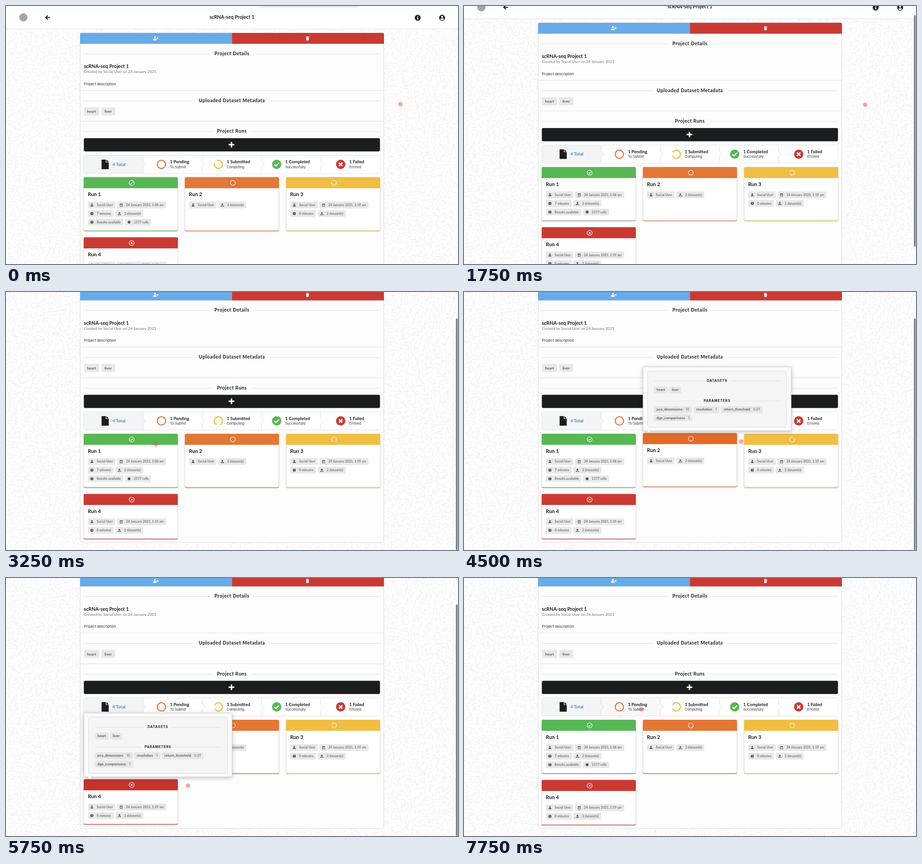
An HTML page with a canvas that plays this animation: 989x566 px, repeating every 8 s.

```html
<!DOCTYPE html>
<html lang="en">
<head>
<meta charset="utf-8">
<title>Project runs</title>
<style>
html, body { margin: 0; width: 100%; height: 100%; overflow: hidden; background: #fff; }
canvas { display: block; }
</style>
</head>
<body>
<canvas id="stage" width="989" height="566"></canvas>
<script>
const W = 989, H = 566, LOOP = 8000, STEP = 250, PAGE_H = 630.6;
const ctx = document.getElementById('stage').getContext('2d');
const USER = 'Social User';
const GREEN = '#57b753', ORANGE = '#e37735', YELLOW = '#f1be43', RED = '#ca3a33';
const DARK = '#1b1c1d', LINE = '#dedede', GREY = '#595959';

const disc = r => `M${-r} 0a${r} ${r} 0 1 0 ${2 * r} 0a${r} ${r} 0 1 0 ${-2 * r} 0z`;
const PERSON = 'M0-4a2 2 0 0 1 0 4a2 2 0 0 1 0-4zM-3.5 3.6v-1q0-2 2-2h3q2 0 2 2v1z';
const ICONS = {
  user: PERSON,
  calendar: 'M-3-3h1v-1h1v1h2v-1h1v1h1q.5 0 .5.5v6q0 .5-.5.5h-6q-.5 0-.5-.5v-6q0-.5.5-.5zM-2.6-1.2v4.2h5.2v-4.2zM-1.8-.4h1v1h-1zM.6-.4h1v1h-1zM-1.8 1.4h1v1h-1z',
  clock: disc(3.8) + 'M-.5-2.6v3l1.8 1.3l.7-.8l-1.5-1v-2.5z',
  upload: 'M0-4l3 3h-2v2.6h-2v-2.6h-2zM-4 1.6h2v1h4v-1h2v2.2h-8z',
  alert: disc(3.8) + 'M-.6-2.4h1.2v2.8h-1.2zM-.6 1.1h1.2v1.2h-1.2z',
  seal: disc(3.5),
  trash: 'M-4-4.5h2.5l.5-.8h2l.5.8h2.5v1.2h-8zM-3.4-2.6h6.8l-.4 7q0 .8-.8.8h-4.4q-.8 0-.8-.8z',
  file: 'M-7.8-10.5h9.3v6h6.3v15h-15.6zM2.8-10.5l5 5h-5z',
  info: disc(6.5) + 'M-1-4h2v2h-2zM-1.5-1h2.5v3.5h.7v1.2h-3.4v-1.2h.7v-2.3h-.5z',
  account: disc(6.5) + 'M0-4.2a2.2 2.2 0 0 1 0 4.4a2.2 2.2 0 0 1 0-4.4zM-4 3.6q.8-2.4 2.6-2.4h2.8q1.8 0 2.6 2.4q-4 3.2-8 0z',
  check: 'M-.45.03l.3.3l.6-.6',
  cross: 'M-.33-.33l.66.66M.33-.33l-.66.66',
  back: 'M5 0H-4.5M.3-4.5L-4.5 0L.3 4.5'
};

function icon(x, y, name, color, scale = 1, lineWidth = 0) {
  const path = new Path2D(ICONS[name]);
  ctx.save();
  ctx.translate(x, y);
  ctx.scale(scale, scale);
  ctx.fillStyle = ctx.strokeStyle = color;
  ctx.lineWidth = lineWidth / scale;
  if (lineWidth) ctx.stroke(path); else ctx.fill(path, 'evenodd');
  ctx.restore();
}

function box(x, y, w, h, fill, radius = 0, border) {
  ctx.beginPath();
  ctx.roundRect(x, y, w, h, radius);
  if (fill) { ctx.fillStyle = fill; ctx.fill(); }
  if (border) { ctx.strokeStyle = border; ctx.lineWidth = 1; ctx.stroke(); }
}

function line(x1, y1, x2, y2, color = LINE) {
  ctx.beginPath();
  ctx.moveTo(x1, y1);
  ctx.lineTo(x2, y2);
  ctx.strokeStyle = color;
  ctx.lineWidth = 1;
  ctx.stroke();
}

function ring(x, y, r, color, lineWidth, gapAngle) {
  const gap = gapAngle === undefined ? 0 : 0.42;
  const mid = (gapAngle || 0) - Math.PI / 2;
  ctx.beginPath();
  ctx.arc(x, y, r, mid + gap, mid + 2 * Math.PI - gap);
  ctx.strokeStyle = color;
  ctx.lineWidth = lineWidth;
  ctx.stroke();
}

function dot(x, y, r, color) {
  ctx.beginPath();
  ctx.arc(x, y, r, 0, 7);
  ctx.fillStyle = color;
  ctx.fill();
}

// Draws text centred on y and returns its width.
function text(str, x, y, font, color, align = 'left', spacing = 0) {
  ctx.font = font + ', sans-serif';
  ctx.letterSpacing = spacing + 'px';
  ctx.textBaseline = 'alphabetic';
  ctx.fillStyle = color;
  const width = ctx.measureText(str).width;
  const size = parseFloat(font.match(/[\d.]+px/)[0]);
  ctx.fillText(str, align === 'center' ? x - width / 2 : x, y + size * 0.35);
  ctx.letterSpacing = '0px';
  return width;
}

function divider(str, x1, x2, y, font, spacing, color = DARK) {
  const mid = (x1 + x2) / 2;
  const half = text(str, mid, y, font, color, 'center', spacing) / 2 + 8;
  line(x1, y + 1, mid - half, y + 1);
  line(mid + half, y + 1, x2, y + 1);
}

function label(str, x, y, w) {
  box(x, y - 9, w, 18, '#e8e8e8', 3);
  text(str, x + w / 2, y, 'bold 8.4px Lato', GREY, 'center');
}

function chip(x, y, iconName, str) {
  const font = 'bold 7.2px Lato';
  ctx.font = font + ', sans-serif';
  const w = ctx.measureText(str).width + 25;
  box(x, y - 7.5, w, 15, '#e8e8e8', 2.5);
  icon(x + 9, y, iconName, '#4f4f4f', 0.87);
  text(str, x + 19.5, y, font, '#757575');
  return x + w + 3.7;
}

function param(x, y, name, value) {
  const font = '600 7.25px Inter';
  ctx.font = font + ', sans-serif';
  const nameW = ctx.measureText(name).width;
  const valueW = value ? ctx.measureText(value).width + 7 : 0;
  const w = nameW + valueW + 11;
  box(x, y - 7.5, w, 15, '#e6e6e7', 2.5);
  text(name, x + 5.5, y, font, GREY);
  if (value) text(value, x + 12.5 + nameW, y, '500 7.25px Inter', '#777');
  return x + w + 4;
}

const people = ['user', USER], sets = ['upload', '2 dataset(s)'];
const date = time => ['calendar', '24 January 2021, ' + time];
const cards = [
  { x: 170, y: 375.5, h: 118.5, color: GREEN, hover: '#4caf48', mark: 'check', rows: [
    [people, date('1:08 am')], [['clock', '7 minutes'], sets],
    [['alert', 'Results available'], ['seal', '2577 cells']]] },
  { x: 391.3, y: 375.5, h: 118.5, color: ORANGE, hover: '#e26a27', rows: [[people, sets]] },
  { x: 612.8, y: 375.5, h: 118.5, color: YELLOW, hover: '#efb52f', spin: true, rows: [
    [people, date('1:19 am')], [['clock', '0 minutes'], sets]] },
  { x: 170, y: 507.5, h: 99.5, color: RED, hover: '#c5332d', mark: 'cross', rows: [
    [people, date('1:19 am')], [['clock', '0 minutes'], sets]] }
];

const steps = [
  { textX: 233, title: '4 Total' },
  { textX: 358.7, title: '1 Pending', note: 'To Submit' },
  { textX: 483, title: '1 Submitted', note: 'Computing' },
  { textX: 611, title: '1 Completed', note: 'Successfully' },
  { textX: 751, title: '1 Failed', note: 'Errored' }
];

function drawCard(card, index, hovered, spin) {
  const { x, h } = card, y = card.y - (hovered ? 1.5 : 0), w = 206;
  const color = hovered ? card.hover : card.color;
  ctx.save();
  ctx.shadowColor = 'rgba(0,0,0,.16)';
  ctx.shadowBlur = hovered ? 5 : 3;
  ctx.shadowOffsetY = 1;
  box(x, y, w, h, color, 3);
  ctx.restore();
  box(x, y, w, h - 1.4, '#fff', 3);
  box(x + 0.25, y + 10, w - 0.5, h - 11.5, '#fff', 3, '#dcdcdd');
  box(x, y, w, 24.3, color, [3, 3, 0, 0]);
  const cx = x + 105, cy = y + 12.5;
  ring(cx, cy, 5.4, '#fff', 1.15, card.spin ? spin : undefined);
  if (card.mark) icon(cx, cy, card.mark, '#fff', 6, 1.3);
  text('Run ' + (index + 1), x + 9, y + 37.7, 'bold 11.2px Lato', DARK);
  card.rows.forEach((row, r) => {
    let cxp = x + 9;
    for (const item of row) cxp = chip(cxp, y + 61 + r * 18.9, ...item);
  });
}

function drawSteps(pendingHover, spin) {
  const left = 170.5, top = 327.5, w = 129.5, h = 39.5;
  box(left, top, w * 5, h, '#fff', 3, LINE);
  for (let i = 4; i >= 0; i--) {
    const x = left + w * i, right = x + w, bg = i === 0 ? '#f3f4f5' : i === 1 && pendingHover ? '#f8f8f9' : '#fff';
    box(x + 0.5, top + 0.5, w - 0.5, h - 1, bg);
    if (i === 4) continue;
    line(right, top, right, top + h);
    ctx.beginPath();
    ctx.moveTo(right - 1, top + 12);
    ctx.lineTo(right + 6, top + 19.8);
    ctx.lineTo(right - 1, top + 27.6);
    ctx.fillStyle = bg;
    ctx.fill();
    ctx.strokeStyle = LINE;
    ctx.stroke();
  }
  const y = 347.4;
  icon(217, y, 'file', DARK);
  ring(340, y, 9.1, ORANGE, 2.3);
  ring(464.7, y, 8.9, YELLOW, 2.6, spin);
  dot(592.3, y, 10.2, GREEN);
  icon(592.3, y, 'check', '#fff', 11, 2.5);
  dot(732.3, y, 10.2, RED);
  icon(732.3, y, 'cross', '#fff', 11, 2.9);
  for (const { textX, title, note } of steps) {
    text(title, textX, note ? 342 : y, 'bold 9.5px Lato', note ? DARK : '#4a86c8');
    if (note) text(note, textX, 353, '7.4px Inter', '#333');
  }
}

function drawPopup(card) {
  ctx.save();
  ctx.translate(card.x, card.y - 147.2);
  ctx.shadowColor = 'rgba(34,36,38,.25)';
  ctx.shadowBlur = 8;
  ctx.shadowOffsetY = 2;
  box(0.5, 0.5, 324, 140, '#fff', 3, '#d4d4d5');
  ctx.shadowColor = 'transparent';
  ctx.beginPath();
  ctx.moveTo(8, 140);
  ctx.lineTo(13, 145);
  ctx.lineTo(18, 140);
  ctx.fillStyle = '#fff';
  ctx.fill();
  ctx.strokeStyle = '#d0d0d1';
  ctx.stroke();
  box(10.5, 9.5, 304, 123.5, '#f5f5f6', 3, '#d9d9da');
  const font = 'bold 7.3px Inter';
  divider('DATASETS', 24.5, 300.5, 30.8, font, 0.85);
  param(param(24.5, 51.2, 'heart'), 51.2, 'liver');
  divider('PARAMETERS', 24.5, 300.5, 74.4, font, 0.85);
  let x = param(24.5, 94.2, 'pca_dimensions', '10');
  x = param(x, 94.2, 'resolution', '1');
  param(x, 94.2, 'return_threshold', '0.01');
  param(24.5, 112.4, 'dge_comparisons', '1');
  ctx.restore();
}

// Wallpaper of scattered short strokes.
const wallpaper = document.createElement('canvas');
wallpaper.width = W;
wallpaper.height = 640;
{
  const g = wallpaper.getContext('2d');
  let seed = 7;
  const rnd = () => (seed = seed * 16807 % 2147483647) / 2147483647;
  g.fillStyle = '#fefefe';
  g.fillRect(0, 0, W, 640);
  g.strokeStyle = '#ebebeb';
  g.lineWidth = 0.9;
  for (let y = 0; y < 640; y += 7.5) for (let x = 0; x < W; x += 7.5) {
    const a = rnd() * Math.PI, px = x + rnd() * 6, py = y + rnd() * 6;
    const dx = Math.cos(a) * 4.2, dy = Math.sin(a) * 4.2;
    g.beginPath();
    g.moveTo(px - dx, py - dy);
    g.lineTo(px + dx, py + dy);
    g.stroke();
  }
}

function drawPage(t, hovered, spin) {
  ctx.drawImage(wallpaper, 0, 0);
  box(0, 0, W, 50, '#fff');
  line(0, 50.5, W, 50.5, '#e0e0e0');
  dot(38, 25, 9, '#a3a5a5');
  icon(91.3, 25.3, 'back', DARK, 1, 2);
  text('scRNA-seq Project 1', 494.3, 24, 'bold 10.7px Lato', DARK, 'center');
  icon(900.8, 25.8, 'info', DARK);
  icon(954.2, 25.8, 'account', DARK);

  box(162.5, 59.5, 664, 554.5, '#fdfdfd', 3, '#dcdcdd');
  box(162, 59, 332.3, 24, '#68abe8', [3, 0, 0, 0]);
  box(494.3, 59, 332.7, 24, RED, [0, 3, 0, 0]);
  icon(325.7, 71, 'user', '#fff', 1.15);
  box(329.3, 70.2, 4.6, 1.4, '#fff');
  box(330.9, 68.6, 1.4, 4.6, '#fff');
  icon(659.7, 71, 'trash', '#fff', 0.88);

  const heading = 'bold 10.5px Lato';
  divider('Project Details', 170.5, 818, 104.2, heading, 0.53);
  text('scRNA-seq Project 1', 170.5, 132.7, 'bold 10.7px Lato', DARK);
  text(`Created by ${USER} on 24 January 2021`, 170.5, 144.3, '8.4px Lato', '#707070');
  text('Project description', 170.5, 171.3, '7.9px Inter', '#2b2b2b');
  line(162, 185.3, 827, 185.3);
  divider('Uploaded Dataset Metadata', 170.5, 818, 207.2, heading, 0.53);
  label('heart', 170.5, 231.2, 33.5);
  label('liver', 208.3, 231.2, 30.5);
  line(162, 252.6, 827, 252.6);
  divider('Project Runs', 170.5, 818, 274.6, heading, 0.53);
  box(170.3, 290, 648, 29, DARK, 3);
  box(487.2, 302.6, 12.4, 3.2, '#fff', 0.6);
  box(491.8, 298, 3.2, 12.4, '#fff', 0.6);

  drawSteps(t >= 7500, spin);
  cards.forEach((card, i) => drawCard(card, i, i === hovered, spin));
  if (hovered >= 0) drawPopup(cards[hovered]);
}

// Linear interpolation through [time, ...values] keys.
function track(keys, t) {
  const i = keys.findIndex(k => k[0] > t);
  if (i === 0) return keys[0].slice(1);
  if (i < 0) return keys[keys.length - 1].slice(1);
  const a = keys[i - 1], b = keys[i], f = (t - a[0]) / (b[0] - a[0]);
  return a.slice(1).map((v, n) => v + (b[n + 1] - v) * f);
}

const scrollKeys = [[1250, 0], [1500, 5], [1750, 22.3], [2000, 50], [2250, 65.3], [2500, 65.2], [2750, 64.6]];
const pointerKeys = [
  [0, 863, 215.5], [1000, 863, 215.5], [1500, 877.6, 216.5], [2500, 877.6, 216.5], [2750, 760, 235], [3000, 480, 300],
  [3250, 328, 334], [3750, 300, 350], [4000, 440, 340], [4500, 606.5, 328], [4750, 680, 335], [5000, 720, 350],
  [5250, 560, 425], [5500, 320, 470], [5750, 398.3, 455.5], [6250, 430, 440], [7000, 415, 340], [7500, 387.3, 288]
];
const hoverSpans = [[3500, 4000, 0], [4000, 4750, 1], [4750, 5250, 2], [5500, 6000, 3]];

function draw(now) {
  const t = Math.floor(now % LOOP / STEP) * STEP;
  const [scroll] = track(scrollKeys, t);
  const span = hoverSpans.find(([from, to]) => t >= from && t < to);
  const spin = t / 2000 * 2 * Math.PI - Math.PI / 4;

  ctx.clearRect(0, 0, W, H);
  ctx.save();
  ctx.translate(0, -scroll);
  drawPage(t, span ? span[2] : -1, spin);
  ctx.restore();

  if (t < 500) {
    ctx.save();
    ctx.globalAlpha = 1 - t / 500;
    ctx.shadowColor = 'rgba(0,0,0,.3)';
    ctx.shadowBlur = 8;
    box(555, -12, 216, 11, '#ddd', 4);
    ctx.restore();
  }
  if (t >= 1500 && t < 6500) box(984.4, scroll * H / PAGE_H, 3.8, H * H / PAGE_H, '#7f7f7f', 2);
  const [px, py] = track(pointerKeys, t);
  dot(px, py, 4.8, 'rgba(240,75,75,.5)');
}

function frame() {
  draw(performance.now());
  requestAnimationFrame(frame);
}
frame();
</script>
</body>
</html>
```
